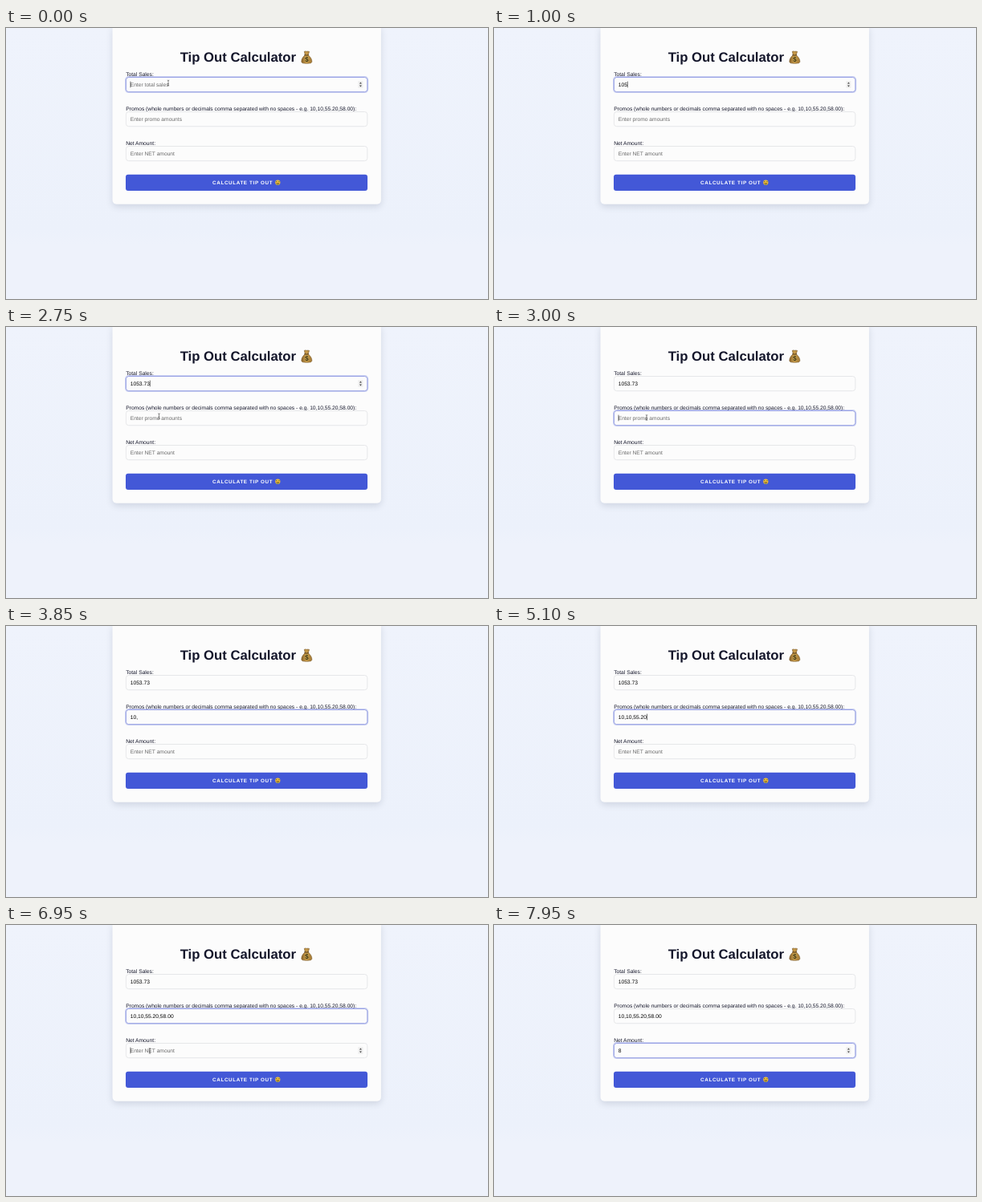
Animation of 600x338 px, one loop 8 s. Source, as an HTML page:

```html
<!DOCTYPE html>
<html lang="en">
<head>
<meta charset="utf-8">
<title>Tip Out Calculator</title>
<style>
html, body { margin: 0; width: 100%; height: 100%; overflow: hidden; background: #edf1fc; }
svg { display: block; width: 100vw; height: 100vh; }
text { font: 6.69px "Liberation Sans", Arial, sans-serif; text-rendering: geometricPrecision; white-space: pre; }
.title { font-size: 16.7px; font-weight: 700; fill: #14162b; }
.label { fill: #15172b; }
.button { font-size: 6.27px; font-weight: 700; letter-spacing: .64px; fill: #fff; }
.dollar { font-size: 8.5px; font-weight: 700; fill: #33280f; stroke: #e3c15f; stroke-width: .8px; paint-order: stroke; }
</style>
</head>
<body>
<svg viewBox="0 0 600 338">
  <defs>
    <linearGradient id="sky" x2="0" y2="1">
      <stop stop-color="#eff3fc"/><stop offset=".74" stop-color="#ecf1fb"/><stop offset=".8" stop-color="#eef2fb"/>
    </linearGradient>
    <linearGradient id="sack" x2="1" y2="0">
      <stop stop-color="#8a6429"/><stop offset=".45" stop-color="#c99c4c"/><stop offset="1" stop-color="#a47a34"/>
    </linearGradient>
    <filter id="soft" x="-20%" y="-20%" width="140%" height="140%"><feGaussianBlur stdDeviation="4.2"/></filter>
  </defs>
  <rect width="600" height="338" fill="url(#sky)"/>
  <rect x="132.5" y="0" width="334.4" height="223" rx="5" fill="#28324f" opacity=".15" filter="url(#soft)"/>
  <rect x="132.5" y="-10" width="334.4" height="229.7" rx="5" fill="#fcfcfc"/>
  <text class="title" x="216.7" y="42.2">Tip Out Calculator</text>

  <g id="moneybag" transform="translate(0 -.5)">
    <path d="M371.3 29.8q1.6-.8 3 0 1.5-.7 3.3.2l-1.5 4.3c2.900 2 4.700 5.200 4.700 7.700 0 2.300-1.500 2.700-6.500 2.700s-6.500-.5-6.500-2.700c0-2.700 2-5.900 4.500-7.700z" fill="url(#sack)" stroke="#6b4b1c" stroke-width=".5"/>
    <path d="M371.4 34.1q2.8 1 5.4 0" fill="none" stroke="#4c3517"/>
    <text class="dollar" x="374.3" y="42.8" text-anchor="middle">$</text>
  </g>

  <g id="fields"></g>

  <rect x="149" y="182.8" width="301" height="20.2" rx="3" fill="#4358d7"/>
  <text class="button" x="257.1" y="195">CALCULATE TIP OUT</text>
  <g id="face">
    <circle cx="338.3" cy="192.7" r="3.1" fill="#f0bd3c"/>
    <path d="M336 191.6h1.5m1.6 0h1.5" stroke="#6f7a35"/>
    <path d="M336.4 193.5h3.8q-.4 2-1.900 2t-1.900-2z" fill="#70451c"/>
    <path d="M337.500 194h1.600v1.800h-1.600z" fill="#8fa34c"/>
  </g>
  <path id="pointer" d="M-1.200-3.400q1.200 0 1.200 1v4.800q0 1-1.200 1M1.200-3.400q-1.200 0-1.200 1m0 4.800q0 1 1.200 1M-.7 1h1.400" fill="none" stroke="#333" stroke-width=".55"/>
</svg>
<script>
const LOOP = 8000, LEFT = 149.2, TEXT_X = 154.7, FONT_SIZE = 6.69;
const SVG_NS = "http://www.w3.org/2000/svg";

// keys: the times at which successive characters of `value` appear
const specs = [
  { y: 61.3, label: "Total Sales:", hint: "Enter total sales", value: "1053.73",
    keys: [450, 700, 950, 1250, 1750, 2050, 2350], focus: [-500, 2800], spinnerSpan: [0, 2800] },
  { y: 104.3, label: "Promos (whole numbers or decimals comma separated with no spaces - e.g. 10,10,55.20,58.00):",
    hint: "Enter promo amounts", value: "10,10,55.20,58.00",
    keys: [3350, 3600, 3850, 4000, 4150, 4300, 4500, 4650, 4900, 5000, 5100, 5300, 5500, 5700, 5950, 6100, 6300],
    focus: [2800, 6900], spinnerSpan: [0, 0] },
  { y: 147.3, label: "Net Amount:", hint: "Enter NET amount", value: "8",
    keys: [7450], focus: [6900, LOOP + 500], spinnerSpan: [6750, LOOP] }
];
const caretOff = [[200, 450], [1500, 1550], [3150, 3350], [3850, 4000], [7200, 7450], [7950, LOOP]];
const pointerOn = [[0, 450], [2400, 3350], [6400, 7450]];

const within = (t, [start, end]) => t >= start && t < end;
const inAny = (t, spans) => spans.some(span => within(t, span));
const clamp = v => Math.max(0, Math.min(1, v));
const ease = v => { v = clamp(v); return v * v * (3 - 2 * v); };
const show = (node, visible) => node.setAttribute("visibility", visible ? "visible" : "hidden");
const advance = text => [...text].reduce((sum, c) => sum + (/\d/.test(c) ? .556 : .278), 0) * FONT_SIZE;

function add(parent, tag, attrs, content) {
  const node = document.createElementNS(SVG_NS, tag);
  for (const name in attrs) node.setAttribute(name, attrs[name]);
  if (content) node.textContent = content;
  return parent.appendChild(node);
}

function buildField(spec) {
  const g = add(document.getElementById("fields"), "g", {});
  const { y } = spec;
  const box = { x: LEFT + .2, y: y + .2, width: 300.4, height: 18.2, rx: 3.3 };
  add(g, "text", { class: "label", x: LEFT, y: y - 1.6 }, spec.label);
  const halo = add(g, "rect", { x: LEFT - .6, y: y - .6, width: 302, height: 19.8, rx: 3.9,
    fill: "none", stroke: "#4358d7", "stroke-width": 1.2, "stroke-opacity": .26 });
  add(g, "rect", { ...box, fill: "#fcfcfc", stroke: "#d9dade", "stroke-width": .6 });
  const edge = add(g, "rect", { ...box, fill: "none", stroke: "#7683e2", "stroke-width": .7 });
  const text = add(g, "text", { x: TEXT_X, y: y + 11.5 });
  const caret = add(g, "rect", { y: y + 5.3, width: .6, height: 7.7, fill: "#111" });
  const spinner = add(g, "g", { transform: `translate(441.4 ${y + 9.2})` });
  add(spinner, "rect", { x: -3.1, y: -4.3, width: 6.2, height: 8.6, fill: "#efefef" });
  add(spinner, "path", { d: "M-1.5-1.1L0-2.9 1.5-1.1zM-1.5 1.1L0 2.9 1.5 1.1z", fill: "#444" });
  return { ...spec, halo, edge, text, caret, spinner };
}

const fields = specs.map(buildField);
const pointer = document.getElementById("pointer");

function drawField(field, t) {
  const [start, end] = field.focus;
  const typed = field.value.slice(0, field.keys.filter(key => t >= key).length);
  const glow = ease((t - start - 50) / 150) * (1 - ease((t - end - 50) / 150));
  field.halo.setAttribute("opacity", glow);
  field.edge.setAttribute("opacity", glow);
  field.text.textContent = typed || field.hint;
  field.text.setAttribute("fill", typed ? "#000" : "#6a6a6a");
  field.caret.setAttribute("x", TEXT_X + advance(typed));
  show(field.caret, within(t, field.focus) && !inAny(t, caretOff));
  show(field.spinner, within(t, field.spinnerSpan));
}

function drawPointer(t) {
  const down = ease((t - 2400) / 400), next = ease((t - 6400) / 450);
  const x = 202 - 12 * down - 11 * next;
  const y = 68.5 + 44.5 * down + 44 * next;
  pointer.setAttribute("transform", `translate(${x} ${y})`);
  show(pointer, inAny(t, pointerOn));
}

function tick() {
  const t = performance.now() % LOOP;
  fields.forEach(field => drawField(field, t));
  drawPointer(t);
  requestAnimationFrame(tick);
}
tick();
</script>
</body>
</html>
```
